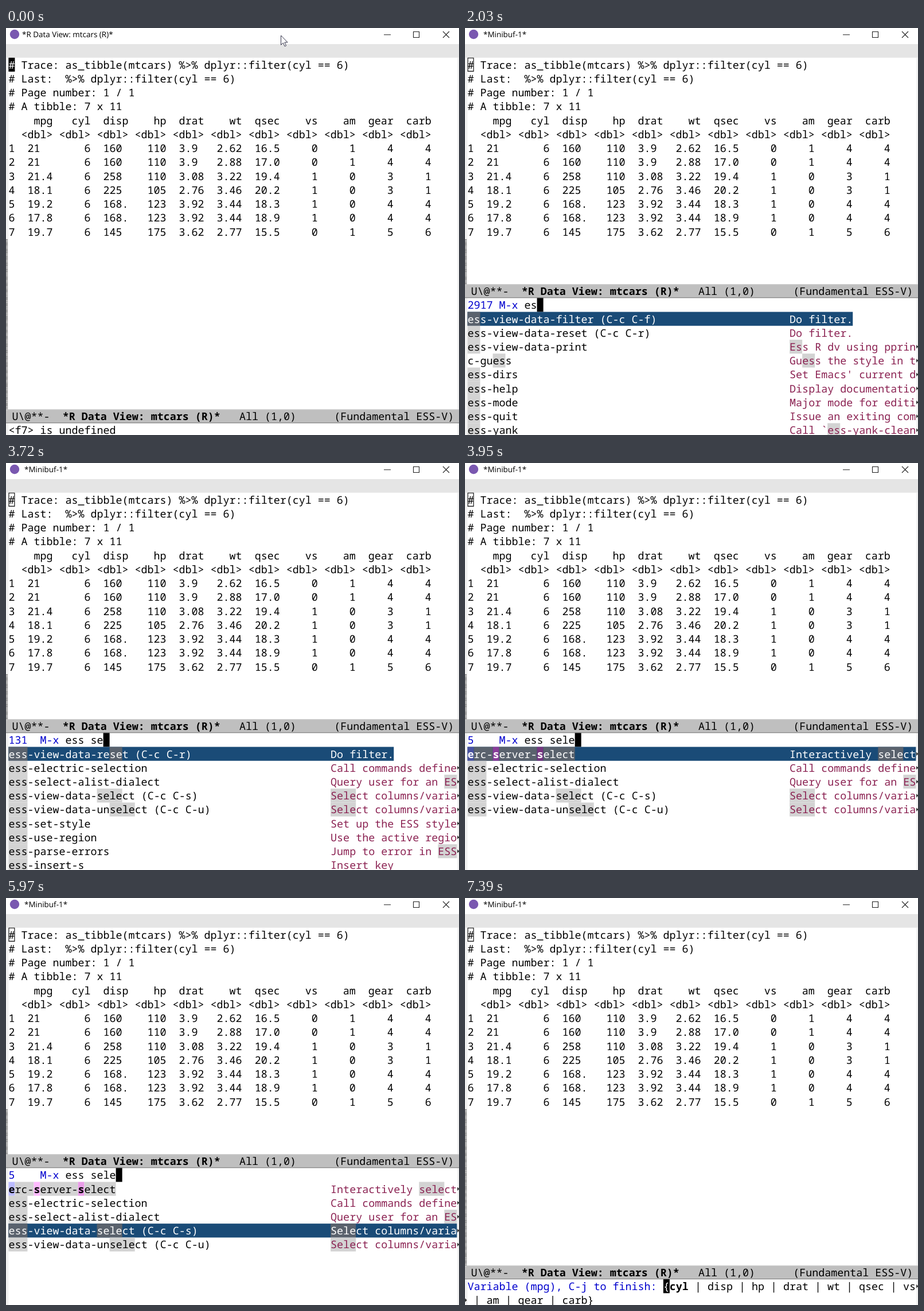
An HTML page for the animation above (8 s loop, 790 by 709 pixels).

```html
<!DOCTYPE html>
<html lang="en">
<head>
<meta charset="utf-8">
<title>R data view</title>
<style>
  html, body { margin: 0; width: 100%; height: 100%; overflow: hidden; background: #fff; }
  svg {
    display: block; width: 790px; height: 709px;
    font: 18.357px "Noto Sans Mono", monospace; text-rendering: geometricPrecision;
  }
  text { white-space: pre; }
  .title { font: 13.45px "Open Sans", sans-serif; }
</style>
</head>
<body>
<script>
// The screen is a 10 x 22 character grid, enlarged by UNIT.
const UNIT = 1.1014, CHAR = 10 * UNIT, ROW = 22 * UNIT, LEFT = 4 * UNIT, TOP = 47 * UNIT;
const LOOP = 8000, BASELINE = 19, DOC_COL = 51, COLS = 71;
// Mode line positions: with a list below it, with a two-line prompt, with one message line.
const MODE_LIST = 405 * UNIT, MODE_PROMPT = 581 * UNIT, MODE_MESSAGE = 603 * UNIT;
const BLUE = '#0000cd', DOC = '#8b2252', CURRENT = '#1a4b77';
// Match faces: background on a plain row, background on the current row.
const FACES = {
  1: ['#d3d3d3', '#5a626d'], 2: ['#e99ce8', '#763680'],
  3: ['#bbbbff', '#4a52a0'], 4: ['#ffbbff', '#8a3d9a'],
};

function el(parent, name, attrs, content) {
  const node = document.createElementNS('http://www.w3.org/2000/svg', name);
  for (const key in attrs) node.setAttribute(key, attrs[key]);
  if (content !== undefined) node.textContent = content;
  return parent.appendChild(node);
}
const rect = (g, x, y, width, height, fill) => el(g, 'rect', { x, y, width, height, fill });
const line = (g, d, stroke = '#222') => el(g, 'path', { d, stroke, fill: 'none', 'stroke-width': UNIT });
const colX = col => LEFT + col * CHAR;
function write(g, x, top, content, fill = '#000', weight = 400) {
  el(g, 'text', { x, y: top + BASELINE, fill, 'font-weight': weight }, content);
}
function block(g, col, top, char = '') {
  rect(g, colX(col), top, CHAR, ROW, '#000');
  write(g, colX(col), top, char, '#fff');
}
function wrapMark(g, x, top) {
  rect(g, x, top + 9.5, 1.5, 5.5, '#444');
  rect(g, x, top + 11.2, 3, 2, '#222');
}

function chrome(g) {
  rect(g, 0, 0, 790, 709, '#fff');
  rect(g, 0, 28, 790, TOP - 28, '#e5e5e5');
  rect(g, 0, TOP, LEFT, 709 - TOP, '#f2f2f2');
  rect(g, 787, TOP, 3, 709 - TOP, '#f2f2f2');
  el(g, 'circle', { cx: 15, cy: 11, r: 8.2, fill: '#7a58b0' });
  line(g, 'M659 11.8h12M710.5 6.5h10v10h-10zM762 6l11 11M773 6l-11 11');
}

function table(g) {
  const cells = (index, list) => index + list.split(',').map(s => s.padStart(6)).join('');
  const rows = [
    '21  ,6,160 ,110,3.9 ,2.62,16.5,0,1,4,4',
    '21  ,6,160 ,110,3.9 ,2.88,17.0,0,1,4,4',
    '21.4,6,258 ,110,3.08,3.22,19.4,1,0,3,1',
    '18.1,6,225 ,105,2.76,3.46,20.2,1,0,3,1',
    '19.2,6,168.,123,3.92,3.44,18.3,1,0,4,4',
    '17.8,6,168.,123,3.92,3.44,18.9,1,0,4,4',
    '19.7,6,145 ,175,3.62,2.77,15.5,0,1,5,6',
  ];
  [
    '# Trace: as_tibble(mtcars) %>% dplyr::filter(cyl == 6)',
    '# Last:  %>% dplyr::filter(cyl == 6)',
    '# Page number: 1 / 1',
    '# A tibble: 7 x 11',
    cells(' ', 'mpg,cyl,disp,hp,drat,wt,qsec,vs,am,gear,carb'),
    cells(' ', Array(11).fill('<dbl>').join()),
    ...rows.map((row, i) => cells(i + 1, row)),
  ].forEach((s, i) => write(g, LEFT, TOP + i * ROW, s));
}

function modeLine(g, top) {
  el(g, 'path', { d: `M1.5 368V${top}`, stroke: '#555', 'stroke-width': 3, 'stroke-dasharray': `${UNIT} ${UNIT}` });
  rect(g, 0, top, 790, ROW, '#bfbfbf');
  rect(g, 0, top, 790, UNIT, '#d4d4d4');
  rect(g, 0, top + ROW - UNIT, 790, UNIT, '#808080');
  const put = (col, s, weight) => write(g, col * CHAR - 0.5, top, s, '#000', weight);
  put(1, 'U\\@**-');
  put(9, '*R Data View: mtcars (R)*', 700);
  put(37, 'All (1,0)');
  put(52, '(Fundamental ESS-V)');
}

// Runs like [ess] or [3:e] carry a match face.
function rich(g, col, top, markup, fill, current) {
  for (const [, face, hit, plain] of markup.matchAll(/\[(?:(\d):)?([^\]]+)\]|([^[]+)/g)) {
    const run = hit || plain;
    if (hit) rect(g, colX(col), top, run.length * CHAR, ROW, FACES[face || 1][current ? 1 : 0]);
    write(g, colX(col), top, run, fill, face ? 700 : 400);
    col += run.length;
  }
}

function candidates(g, { count, input, current = 0, rows }) {
  const top = MODE_LIST + ROW;
  write(g, LEFT, top, String(count).padEnd(5) + 'M-x', BLUE);
  write(g, colX(9), top, input);
  block(g, 9 + input.length, top);
  rows.forEach((row, i) => {
    const y = top + (i + 1) * ROW, on = i === current;
    const [name, doc = ''] = row.split('|');
    const end = DOC_COL + doc.replace(/\[(\d:)?|\]/g, '').length;
    if (on) rect(g, LEFT, y, end * CHAR, ROW, CURRENT);
    rich(g, 0, y, name, on ? '#fff' : '#000', on);
    rich(g, DOC_COL, y, doc, on ? '#fff' : DOC, on);
    if (end >= COLS) wrapMark(g, 787, y);
  });
}

function variables(g, chosen) {
  const names = ['mpg', 'cyl', 'disp', 'hp', 'drat', 'wt', 'qsec', 'vs', 'am', 'gear', 'carb'].filter(n => n !== chosen);
  const prompt = `Variable (${chosen}), C-j to finish: `, start = prompt.length + 1;
  const list = names.join(' | ') + '}', fit = COLS - start;
  const top = MODE_PROMPT + ROW;
  write(g, LEFT, top, prompt, BLUE);
  block(g, start - 1, top, '{');
  write(g, colX(start), top, names[0], '#000', 700);
  write(g, colX(start + 3), top, list.slice(3, fit));
  write(g, LEFT, top + ROW, list.slice(fit));
  wrapMark(g, 787, top);
  wrapMark(g, 0, top + ROW);
}

const views = [
  'ess-view-data-filter (C-c C-f)|Do filter.',
  'ess-view-data-reset (C-c C-r)|Do filter.',
  'ess-view-data-print|Ess R dv using pprin',
];
const recent = [...views, 'R', 'disable-theme|Disable all variable', 'my-app-firefox|Tolvix',
  "S|Call 'Splus6', based", 'r', 'rg'];
const matching = [...views, 'c-guess|Guess the style in t', "ess-dirs|Set Emacs' current d",
  'ess-help|Display documentatio', 'ess-mode|Major mode for editi',
  'ess-quit|Issue an exiting com', 'ess-yank|Call `ess-yank-clean'];
const selects = [
  '[ess]-electric-selection|Call commands define',
  '[ess]-select-alist-dialect|Query user for an [ES]',
  '[ess]-view-data-[sele]ct (C-c C-s)|[Sele]ct columns/varia',
  '[ess]-view-data-un[sele]ct (C-c C-u)|[Sele]ct columns/varia',
];
const narrowed = ['[3:e][rc-][4:s][erver-][2:s][elect]|Interactively [sele]ct', ...selects];
const wider = ['[ess]-view-data-re[se]t (C-c C-r)|Do filter.', ...selects,
  '[ess]-set-style|Set up the ESS style', '[ess]-use-region|Use the active regio',
  '[ess]-parse-errors|Jump to error in [ESS]', '[ess]-insert-s|Insert key'];
const mark = (rows, re) => rows.map(row => row.split('|').map(s => s.replace(re, '[$&]')).join('|'));
const pick = (at, current) => ({ at, count: 5, input: 'ess sele', current, rows: narrowed });

const steps = [
  { at: 0, mode: MODE_MESSAGE },
  { at: 1470, count: 7895, input: '', rows: recent },
  { at: 1700, count: 6874, input: 'e', rows: mark([...recent.filter(s => /^[^|]*e/.test(s)), 'erc', 'eww', 'ert', 'ediff'], /e/i) },
  { at: 2030, count: 2917, input: 'es', rows: mark(matching, /es/i) },
  { at: 2180, count: 588, input: 'ess', rows: mark(matching, /ess/i) },
  { at: 2330, count: 588, input: 'ess ', rows: mark(matching, /ess/i) },
  { at: 3550, count: 588, input: 'ess s', rows: mark(matching, /ess|(?<=re)s|(?<=Di)s|s(?=ty)/gi) },
  { at: 3720, count: 131, input: 'ess se', rows: wider },
  { at: 3870, count: 14, input: 'ess sel', rows: [...narrowed, ...wider.slice(5)] },
  pick(3950, 0), pick(5590, 1), pick(5820, 2), pick(5970, 3),
  { at: 6520, mode: MODE_PROMPT, chosen: '' },
  { at: 7390, mode: MODE_PROMPT, chosen: 'mpg' },
];

const svg = el(document.body, 'svg', { viewBox: '0 0 790 709' });
const base = el(svg, 'g');
chrome(base);
table(base);

const scenes = steps.map((step, i) => {
  const g = el(svg, 'g', { display: 'none' });
  el(g, 'text', { class: 'title', x: i ? 32 : 28, y: 16 }, i ? '*Minibuf-1*' : '*R Data View: mtcars (R)*');
  modeLine(g, step.mode || MODE_LIST);
  if (i === 0) {
    block(g, 0, TOP, '#');
    write(g, LEFT, MODE_MESSAGE + ROW, '<f7> is undefined');
  } else {
    line(g, 'M5 52.3h9.9v23.1h-9.9z', '#000');
    if (step.rows) candidates(g, step);
    else variables(g, step.chosen);
  }
  if (step.at < 1700) {
    el(g, 'path', { d: 'M479.5 13v16.4l3.8-3.5 2.8 6 2.5-1.1-2.7-5.8h5.2z', fill: '#fff', stroke: '#33334a' });
  }
  return g;
});

let shown = -1;
function tick() {
  const t = performance.now() % LOOP;
  const next = steps.findLastIndex(step => step.at <= t);
  if (next !== shown) {
    scenes.forEach((g, i) => g.setAttribute('display', i === next ? 'inline' : 'none'));
    shown = next;
  }
  requestAnimationFrame(tick);
}
tick();
</script>
</body>
</html>
```
